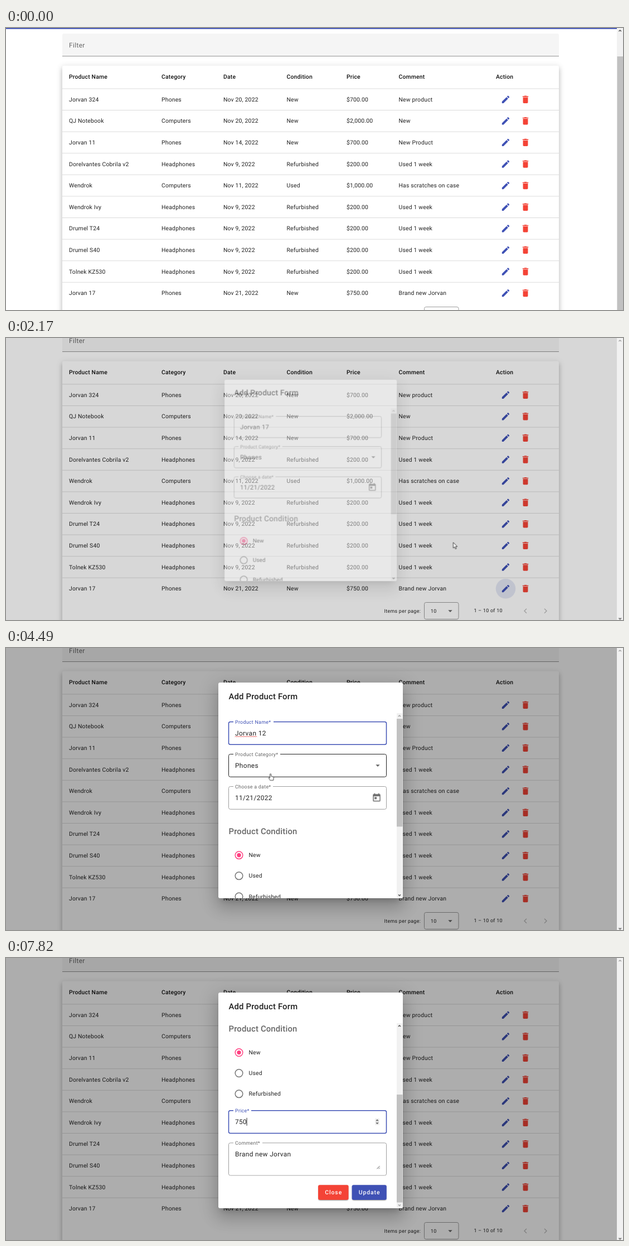
An HTML page that plays this animation: 1107 by 506 pixels, repeating every 8000 ms.

```html
<!DOCTYPE html>
<html lang="en">
<head>
<meta charset="utf-8">
<title>Product table</title>
<style>
  html, body { margin: 0; width: 100%; height: 100%; overflow: hidden; background: #fff; }
  svg { display: block; width: 100%; height: 100%; }
  text { font: 400 10.39px Roboto, sans-serif; letter-spacing: .0178em; fill: #212121; white-space: pre; text-rendering: geometricPrecision; }
  .head { font-weight: 500; fill: #111; }
  .title { font-size: 14.84px; font-weight: 500; letter-spacing: .0125em; }
  .value { font-size: 11.87px; letter-spacing: .03125em; }
  .label { font-size: 8.9px; letter-spacing: .03125em; fill: #666; }
  .small { font-size: 8.9px; letter-spacing: .0333em; }
  .button { font-weight: 500; letter-spacing: .0893em; }
  .day { font-size: 9.65px; letter-spacing: 0; }
  .week { font-size: 8.16px; letter-spacing: 0; fill: #777; }
  .muted { fill: #666; }
  .white { fill: #fff; }
  .mid { text-anchor: middle; }
  .line { stroke: #000; stroke-opacity: .14; }
  .box { fill: none; stroke: #9e9e9e; stroke-width: 1px; }
  .chev { fill: none; stroke-width: 1.4; }
  #dialog { transform-origin: 546.5px 255.5px; }
  #calendar { transform-origin: 509px 269px; }
</style>
</head>
<body>
<svg id="stage" viewBox="0 0 1107 506"></svg>
<script>
const LOOP = 8000, ZOOM = .742;
const BLUE = '#3f51b5', RED = '#f44336', PINK = '#ff4081', DARK = '#212121', GREY = '#9e9e9e';
const range = n => [...Array(n).keys()];

// Drawing helpers
const text = (x, y, s, cls = '', id = '') =>
  `<text id="${id}" x="${x}" y="${y}" dy=".355em" class="${cls}">${s}</text>`;
const rect = (x, y, w, h, fill, attrs = '') =>
  `<rect x="${x}" y="${y}" width="${w}" height="${h}" fill="${fill}" ${attrs}/>`;
const circle = (x, y, r, attrs) => `<circle cx="${x}" cy="${y}" r="${r}" ${attrs}/>`;
const line = (x1, y, x2) => `<path class="line" d="M${x1} ${y}H${x2}"/>`;
const drop = (x, y, fill = '#666') => `<path d="M${x - 3.7} ${y - 1.8}h7.4l-3.7 3.7z" fill="${fill}"/>`;
const chevron = (x, y, turn, size, color, id = '') =>
  `<path id="${id}" class="chev" stroke="${color}" d="M${-size} ${size / 2}L0 ${-size / 2}L${size} ${size / 2}" transform="translate(${x} ${y}) rotate(${turn})"/>`;
const icon = (x, y, d, fill, id = '') =>
  `<path id="${id}" fill="${fill}" d="${d}" transform="translate(${x} ${y}) scale(${ZOOM}) translate(-12 -12)"/>`;

const ELEVATION = {
  2: [[3, 1, -2, .2], [2, 2, 0, .14], [1, 5, 0, .12]],
  4: [[2, 4, -1, .2], [4, 5, 0, .14], [1, 10, 0, .12]],
  8: [[5, 5, -3, .2], [8, 10, 1, .14], [3, 14, 2, .12]],
  24: [[11, 15, -7, .2], [24, 38, 3, .14], [9, 46, 8, .12]]
};
const card = (x, y, w, h, level, fill = '#fff') =>
  ELEVATION[level].map(([dy, blur, spread, alpha]) => {
    const s = spread * ZOOM;
    return rect(x - s, y - s + dy * ZOOM, w + 2 * s, h + 2 * s, '#000',
      `rx="3" opacity="${alpha}" style="filter:blur(${blur * ZOOM / 2}px)"`);
  }).join('') + rect(x, y, w, h, fill, 'rx="3"');

const PEN = 'M3 17.25V21h3.75L17.81 9.94l-3.75-3.75L3 17.25zM20.71 7.04c.39-.39.39-1.02 0-1.41l-2.34-2.34c-.39-.39-1.02-.39-1.41 0l-1.83 1.83 3.75 3.75 1.83-1.83z';
const BIN = 'M6 19c0 1.1.9 2 2 2h8c1.1 0 2-.9 2-2V7H6v12zM19 4h-3.5l-1-1h-5l-1 1H5v2h14V4z';
const EVENT = 'M19 3h-1V1h-2v2H8V1H6v2H5c-1.11 0-2 .9-2 2v14c0 1.1.89 2 2 2h14c1.1 0 2-.9 2-2V5c0-1.1-.9-2-2-2zm0 16H5V8h14v11zM7 10h5v5H7z';

// Table page
const COLUMNS = [113, 279, 390, 503.5, 611, 704.5, 879];
const HEADERS = ['Product Name', 'Category', 'Date', 'Condition', 'Price', 'Comment', 'Action'];
const used = name => [name, 'Headphones', 'Nov 9, 2022', 'Refurbished', '$200.00', 'Used 1 week'];
const ROWS = [
  ['Jorvan 324', 'Phones', 'Nov 20, 2022', 'New', '$700.00', 'New product'],
  ['QJ Notebook', 'Computers', 'Nov 20, 2022', 'New', '$2,000.00', 'New'],
  ['Jorvan 11', 'Phones', 'Nov 14, 2022', 'New', '$700.00', 'New Product'],
  used('Dorelvantes Cobrila v2'),
  ['Wendrok', 'Computers', 'Nov 11, 2022', 'Used', '$1,000.00', 'Has scratches on case'],
  used('Wendrok Ivy'), used('Drumel T24'), used('Drumel S40'), used('Tolnek KZ530'),
  ['Jorvan 17', 'Phones', 'Nov 21, 2022', 'New', '$750.00', 'Brand new Jorvan']
];
const tableRow = (cells, i) => {
  const top = 108.9 + 38.6 * i, y = top + 19.3;
  return line(101, top, 992) + cells.map((s, c) => text(COLUMNS[c], y, s)).join('') +
    icon(896.5, y, PEN, BLUE) + icon(932, y, BIN, RED);
};
const page = `<g id="page">
  ${rect(0, -40, 1096, 41.8, BLUE)}
  <path d="M101 51V13q0-3 3-3H989q3 0 3 3V51z" fill="#f5f5f5"/>
  ${rect(101, 50, 891, 1, '#949494')}
  ${text(113, 30.5, 'Filter', 'value muted')}
  ${card(101, 67.5, 891, 480, 8)}
  ${circle(896.5, 475.8, 17.8, `id="ripple" fill="${BLUE}"`)}
  ${HEADERS.map((s, c) => text(COLUMNS[c], 87.8, s, 'head')).join('')}
  ${ROWS.map(tableRow).join('')}
  ${text(678.5, 515.8, 'Items per page:', 'small')}
  ${rect(750.5, 500.5, 61.5, 30, 'none', 'class="box" rx="3"')}
  ${text(762, 515.8, '10', 'small')}${drop(797, 516)}
  ${text(839.5, 515.3, '1 – 10 of 10', 'small')}
  ${chevron(932, 515.8, -90, 4, '#bdbdbd')}${chevron(968, 515.8, 90, 4, '#bdbdbd')}
</g>
${rect(0, 0, 1096, 506, '#000', 'id="backdrop"')}
${rect(1096, 0, 11, 506, '#f1f1f1')}
${rect(1096.5, 51, 10.5, 480, '#c1c1c1', 'id="thumb"')}
${chevron(1101.7, 5, 0, 2.2, '#505050', 'pageUp')}
${chevron(1101.7, 503.5, 180, 2.2, '#505050', 'pageDown')}`;

// Dialog
const field = (id, y, h, label, notch) =>
  rect(399.5, y, 283, h, 'none', `id="${id}" class="box" rx="3"`) +
  rect(408, y - 2, notch - 408, 4, '#fff') + text(411, y, label, 'label', id + 'Label');
const radio = (y, label, on) =>
  circle(418, y, 6.8, `fill="none" stroke-width="1.5" stroke="${on ? PINK : '#757575'}"`) +
  (on ? circle(418, y, 3.7, `fill="${PINK}"`) : '') + text(435.5, y, label);
const caret = (id, x, y) => rect(x, y - 7, .9, 14, '#111', `id="${id}"`);
const button = (x, w, label, fill) =>
  card(x, 609.4, w, 26.8, 2, fill) + text(x + w / 2 + .4, 622.6, label, 'button white mid');

const form = `<g id="form">
  ${field('name', 132.5, 40.8, 'Product Name*', 480)}
  ${['Jorvan 17', 'Jorvan 1', 'Jorvan 12'].map((s, i) => text(411, 153, s, 'value', 'name' + i)).join('')}
  <path id="squiggle" fill="none" stroke="#e53935" stroke-width=".9" d="M411 159.6${'l1.5-1.5l1.5 1.5'.repeat(13)}"/>
  ${caret('caretEnd', 466.3, 152.5)}${caret('caretBack', 460, 152.5)}
  ${field('category', 190.5, 40.8, 'Product Category*', 492)}
  ${text(411, 211, 'Phones', 'value')}${drop(667, 211)}
  ${field('date', 248.5, 40.8, 'Choose a date*', 479)}
  ${text(411, 269, '11/21/2022', 'value', 'dateOld')}${text(411, 269, '11/16/2022', 'value', 'dateNew')}
  ${circle(665, 268.8, 17.8, 'id="toggle"')}${icon(665, 268.8, EVENT, '#666', 'event')}
  ${text(399.5, 329.2, 'Product Condition', 'title muted')}
  ${radio(371.8, 'New', true)}${radio(408.8, 'Used')}${radio(446, 'Refurbished')}
  ${field('price', 476, 40.8, 'Price*', 440)}
  ${text(411, 496.3, '750', 'value')}${caret('caretPrice', 431.6, 496)}
  <g id="spinner">${rect(662, 490, 8, 12, '#efefef')}${chevron(666, 493.6, 0, 1.8, '#555')}${chevron(666, 498.4, 180, 1.8, '#555')}</g>
  ${field('comment', 534, 58.4, 'Comment*', 460)}
  ${text(411, 554.3, 'Brand new Jorvan', 'value')}
  <path d="M665.5 580.5l5-5M668.5 580.5l2-2" stroke="#444" stroke-width=".9"/>
  ${button(560, 54.6, 'Close', RED)}${button(620.6, 62.2, 'Update', BLUE)}
</g>`;
const dialog = `<clipPath id="view"><path d="M381 117H701V449H381z"/></clipPath>
<g id="dialog">
  ${card(381, 62, 331, 387, 24)}
  ${text(399.5, 86.5, 'Add Product Form', 'title')}
  <g clip-path="url(#view)">${form}</g>
  ${rect(701, 117, 10.5, 331, '#f1f1f1')}
  ${rect(701, 127, 10.5, 193.5, '#c1c1c1', 'id="formThumb"')}
  ${chevron(706, 122, 0, 2.1, '#505050', 'formUp')}${chevron(706, 443.5, 180, 2.1, '#505050', 'formDown')}
</g>`;

// Date picker
const dayX = c => 419.8 + 29.7 * c, dayY = r => 134 + 29.8 * r;
const calendar = `<g id="calendar">
  ${card(399, 6, 220, 263, 4)}
  ${text(415, 37.5, 'NOV 2022', 'button')}${drop(477, 38)}
  ${chevron(570.5, 37.5, -90, 4.2, '#555')}${chevron(600.3, 37.5, 90, 4.2, '#555')}
  ${[...'SMTWTFS'].map((s, c) => text(dayX(c), 69.7, s, 'week mid')).join('')}
  ${line(399, 83.5, 619)}
  ${text(415, 104.3, 'NOV', 'muted')}
  ${circle(dayX(3), dayY(2), 13.2, `id="pick" fill="${BLUE}" fill-opacity=".3"`)}
  ${circle(dayX(1), dayY(3), 13.4, `fill="${BLUE}"`)}
  ${circle(dayX(1), dayY(3), 12.2, 'fill="none" stroke="#fff" stroke-width=".8"')}
  ${range(30).map(i => text(dayX((i + 2) % 7), dayY(Math.floor((i + 2) / 7)), i + 1, 'day mid' + (i === 20 ? ' white head' : ''))).join('')}
</g>`;

const cursor = `<g id="cursor" fill="#fff" stroke="#111" stroke-width=".8" stroke-linejoin="round">
  <path id="arrow" d="M0 0V10.2L2.3 8L4 11.8L5.7 11L4.1 7.4H7.2Z"/>
  <path id="hand" d="M-1.1 .8Q0-.8 1.1 .8V4.6L4.9 5.6Q6 6 5.8 7.2L5 11.8H-.8L-3.3 7.8Q-3.6 6.4-1.1 7.4Z"/>
</g>`;

document.getElementById('stage').innerHTML = page + dialog + calendar + cursor;

// Motion helpers: every track becomes one looping set of keyframes
const sheet = document.head.appendChild(document.createElement('style'));
let count = 0, rules = '';
function track(id, prop, points, timing = 'linear') {
  const name = 'k' + count++, el = document.getElementById(id);
  const all = [[0, points[0][1]], ...points, [LOOP, points[points.length - 1][1]]];
  rules += `@keyframes ${name}{${all.map(([t, v]) => `${t / LOOP * 100}%{${prop}:${v}}`).join('')}}`;
  el.style.animation = [el.style.animation, `${name} ${LOOP}ms ${timing} infinite`].filter(Boolean).join(', ');
}
const steps = (id, prop, ...points) => track(id, prop, points, 'step-end');
const show = (id, ...spans) =>
  steps(id, 'opacity', [0, 0], ...spans.flatMap(([a, b]) => [[a, 1], [b, 0]]));
const move = (id, points) =>
  track(id, 'transform', points.map(([t, x, y]) => [t, `translate(${x}px,${y}px)`]));
const focus = (id, from, to) => {
  steps(id, 'stroke-width', [0, '1px'], [from, '1.5px'], [to, '1px']);
  steps(id + 'Label', 'fill', [0, '#666'], [from, BLUE], [to, '#666']);
};

// Page scroll and opening of the dialog
const pageScroll = [[1060, 0], [1130, 4], [1300, 16], [1500, 26]];
move('page', pageScroll.map(([t, y]) => [t, 0, -y]));
move('thumb', pageScroll.map(([t, y]) => [t, 0, y * .85]));
steps('thumb', 'fill', [0, '#c1c1c1'], [680, '#a8a8a8'], [1060, '#787878'], [1550, '#c1c1c1']);
show('thumb', [0, 2100]);
steps('pageUp', 'stroke', [0, '#505050'], [2100, '#a3a3a3']);
show('pageDown', [2100, LOOP]);
track('ripple', 'opacity', [[1889, 0], [1890, .04], [1960, .06], [2100, .15], [2230, .12], [2450, 0]]);
track('backdrop', 'opacity', [[2099, 0], [2100, .03], [2230, .26], [2350, .31], [2480, .32]]);
track('dialog', 'opacity', [[2099, 0], [2100, .05], [2230, .76], [2300, 1]]);
track('dialog', 'transform', [[2060, 'scale(.7)'], [2100, 'scale(.86)'], [2230, 'scale(.995)'], [2300, 'scale(1)']]);

// Editing the name
steps('name', 'stroke', [0, GREY], [2400, BLUE], [5110, GREY]);
focus('name', 2400, 5110);
show('squiggle', [2400, LOOP]);
show('name0', [0, 3730]);
show('name1', [3730, 3890]);
show('name2', [3890, LOOP]);
show('caretEnd', [3150, 3730], [3890, 4490], [4950, 5110]);
show('caretBack', [3730, 3890]);

// Picking a date
steps('category', 'stroke', [0, GREY], [4490, DARK], [4550, GREY]);
steps('date', 'stroke', [0, GREY], [4620, DARK], [5250, GREY]);
steps('toggle', 'opacity', [0, 0], [4950, .05], [5110, .1], [6320, .13]);
steps('event', 'fill', [0, '#666'], [5110, BLUE], [6320, '#666']);
track('calendar', 'opacity', [[5100, 0], [5230, 1], [6310, 1], [6410, 0]]);
track('calendar', 'transform', [[5100, 'scaleY(.8)'], [5230, 'scaleY(1)']]);
show('pick', [5700, 6320]);
show('dateOld', [0, 6320]);
show('dateNew', [6320, LOOP]);

// Scrolling the form and focusing the price
const formScroll = [[6710, 0], [6880, 80], [7000, 128], [7100, 128], [7340, 202.2]];
move('form', formScroll.map(([t, y]) => [t, 0, -y]));
move('formThumb', formScroll.map(([t, y]) => [t, 0, y * .584]));
steps('formUp', 'stroke', [0, '#a3a3a3'], [6720, '#505050']);
steps('formDown', 'stroke', [0, '#505050'], [7340, '#a3a3a3']);
steps('comment', 'stroke', [0, GREY], [7340, DARK], [7500, GREY]);
steps('price', 'stroke', [0, GREY], [7000, DARK], [7250, GREY], [7580, DARK], [7820, BLUE]);
focus('price', 7820, LOOP);
show('spinner', [7580, LOOP]);
show('caretPrice', [7820, LOOP]);

// Pointer
move('cursor', [
  [1550, 1118, 330], [1810, 925, 449], [1890, 905, 451], [1960, 892, 447], [2100, 892, 447],
  [2230, 728, 300], [2450, 570, 195], [2840, 473, 144], [2920, 473, 144],
  [4480, 474.5, 225.5], [4490, 474.5, 225.5], [4620, 490, 240], [4950, 681, 269], [5110, 681, 269],
  [5530, 533, 237], [5750, 507, 195], [5900, 507, 195], [5990, 506, 194], [6320, 506, 194], [6700, 550, 371]
]);
show('arrow', [1550, 2920], [5250, 5700], [6320, 7000]);
show('hand', [4490, 4620], [4950, 5250], [5700, 6320]);

sheet.textContent = rules;
</script>
</body>
</html>
```
